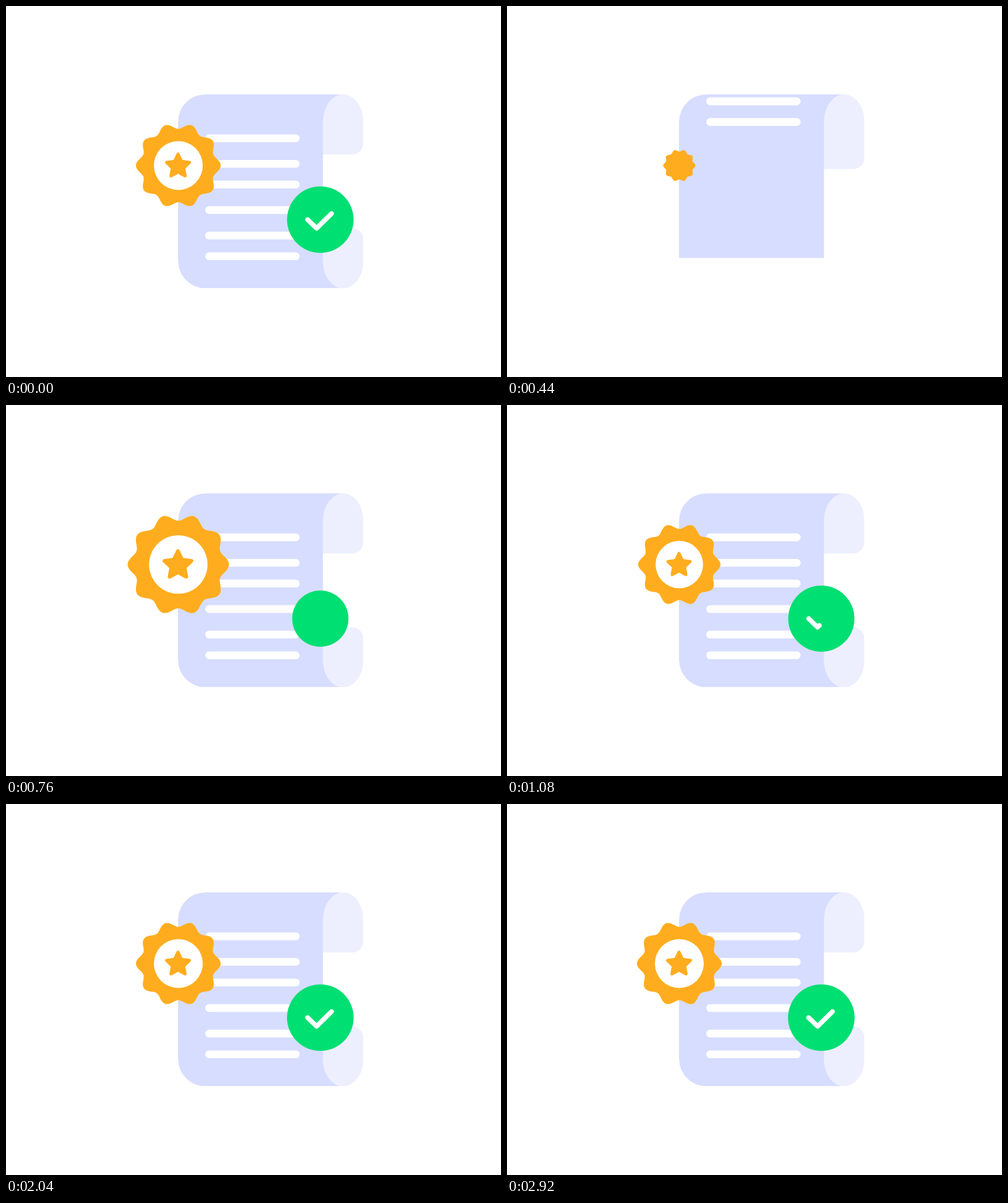
Write an HTML page with a canvas that moves like this. It is 800 px wide and 600 px high and loops after 3000 ms.

```html
<!DOCTYPE html>
<html lang="en">
<head>
<meta charset="utf-8">
<title>Certificate</title>
<style>
  html, body { margin: 0; width: 100%; height: 100%; overflow: hidden; background: #fff; }
  canvas { display: block; }
</style>
</head>
<body>
<canvas id="stage" width="800" height="600"></canvas>
<script>
const ctx = document.getElementById('stage').getContext('2d');
const LOOP = 3000, STEP = 40;
const TOP = 143, BOTTOM = 456.5, CURL = 97;
const FRONT = '#d7ddff', BACK = '#edefff', GOLD = '#ffad1e', GREEN = '#00df72';
const LINES = [214, 255.3, 288.7, 330, 371.3, 404.8];

const frontPath = new Path2D(
  'M278 187A44 44 0 0 1 322 143H545A32.5 43.5 0 0 0 512.5 186.5V413A32.5 43.5 0 0 0 545 456.5H322A44 44 0 0 1 278 412.5Z');
const backPath = new Path2D(
  'M344 143H545A32.5 43.5 0 0 1 577.5 186.5V413A32.5 43.5 0 0 1 545 456.5A32.5 43.5 0 0 1 512.5 413H344Z');

const progress = (t, start, end) => Math.min(1, Math.max(0, (t - start) / (end - start)));
const outQuad = p => p * (2 - p);
const inOutQuad = p => p < .5 ? 2 * p * p : 1 - 2 * (1 - p) ** 2;
const inOutCubic = p => p < .5 ? 4 * p ** 3 : 1 - 4 * (1 - p) ** 3;

// Linear growth followed by a decaying swing around full size.
function spring(t, start) {
  const rise = 245, u = (t - start - rise) / 1000;
  if (u < 0) return progress(t, start, start + rise);
  return 1 + .48 * Math.exp(-5 * u) * Math.sin(2 * Math.PI * 1.8 * u);
}

function scoped(draw) {
  ctx.save();
  draw();
  ctx.restore();
}

function clipRect(x, y, w, h) {
  ctx.beginPath();
  ctx.rect(x, y, w, h);
  ctx.clip();
}

function disc(r, color) {
  ctx.beginPath();
  ctx.arc(0, 0, r, 0, 2 * Math.PI);
  ctx.fillStyle = color;
  ctx.fill();
}

function polar(count, radius, turn) {
  ctx.beginPath();
  for (let i = 0; i < count; i++) {
    const a = i / count * 2 * Math.PI, r = radius(a, i);
    ctx.lineTo(r * Math.cos(a + turn), r * Math.sin(a + turn));
  }
  ctx.closePath();
}

function backSheet(y, h) {
  ctx.clip(backPath);
  ctx.beginPath();
  ctx.roundRect(344, y, 233.5, h, 18);
  ctx.fillStyle = BACK;
  ctx.fill();
}

function paper(t) {
  const height = BOTTOM - TOP;
  const unrolled = inOutQuad(progress(t, 70, 710)) * (height + CURL);
  const lower = Math.max(0, unrolled - height);
  const edge = TOP + 134 * outQuad(progress(t, 40, 280))
    - 37 * inOutQuad(progress(t, 280, 658));

  scoped(() => backSheet(edge - 200, 200));
  scoped(() => {
    clipRect(500, BOTTOM - lower, 100, lower);
    backSheet(BOTTOM - CURL, 200);
  });
  scoped(() => {
    clipRect(270, TOP, 300, Math.min(unrolled, height));
    ctx.clip(frontPath);
    ctx.fillStyle = FRONT;
    ctx.fill(frontPath);
    ctx.translate(0, -300 * (1 - inOutCubic(progress(t, 280, 670))));
    ctx.strokeStyle = '#fff';
    ctx.lineWidth = 12.6;
    ctx.lineCap = 'round';
    ctx.beginPath();
    for (const y of LINES) {
      ctx.moveTo(328.3, y);
      ctx.lineTo(468.3, y);
    }
    ctx.stroke();
  });
}

function badge(t) {
  const size = spring(t, 347);
  if (!size) return;
  ctx.translate(278.5, 258);
  ctx.scale(size, size);
  polar(240, a => 63.9 + 4.6 * Math.cos(10 * a), 0);
  ctx.fillStyle = GOLD;
  ctx.fill();
  disc(39.5 * progress(t, 480, 676), '#fff');

  const star = outQuad(progress(t, 600, 780));
  if (!star) return;
  ctx.translate(-.5, 1);
  ctx.scale(star, star);
  polar(10, (a, i) => i % 2 ? 9.6 : 19.5, -Math.PI / 2);
  ctx.fillStyle = ctx.strokeStyle = GOLD;
  ctx.lineWidth = 5;
  ctx.lineJoin = 'round';
  ctx.fill();
  ctx.stroke();
}

function tick(t) {
  const size = spring(t, 553);
  if (!size) return;
  ctx.translate(508, 345.5);
  ctx.scale(size, size);
  disc(53.8, GREEN);

  const drawn = 54.1 * inOutQuad(progress(t, 920, 1258));
  if (!drawn) return;
  ctx.beginPath();
  ctx.moveTo(-20.5, 0);
  ctx.lineTo(-6, 14);
  ctx.lineTo(18, -9.8);
  ctx.setLineDash([drawn, 100]);
  ctx.strokeStyle = '#fff';
  ctx.lineWidth = 7.6;
  ctx.lineCap = ctx.lineJoin = 'round';
  ctx.stroke();
}

function frame(now) {
  // The loop opens on the finished pose for one step.
  const t = Math.floor(now % LOOP / STEP) * STEP || LOOP;
  ctx.clearRect(0, 0, 800, 600);
  for (const part of [paper, badge, tick]) scoped(() => part(t));
  requestAnimationFrame(frame);
}
frame(0);
</script>
</body>
</html>
```
